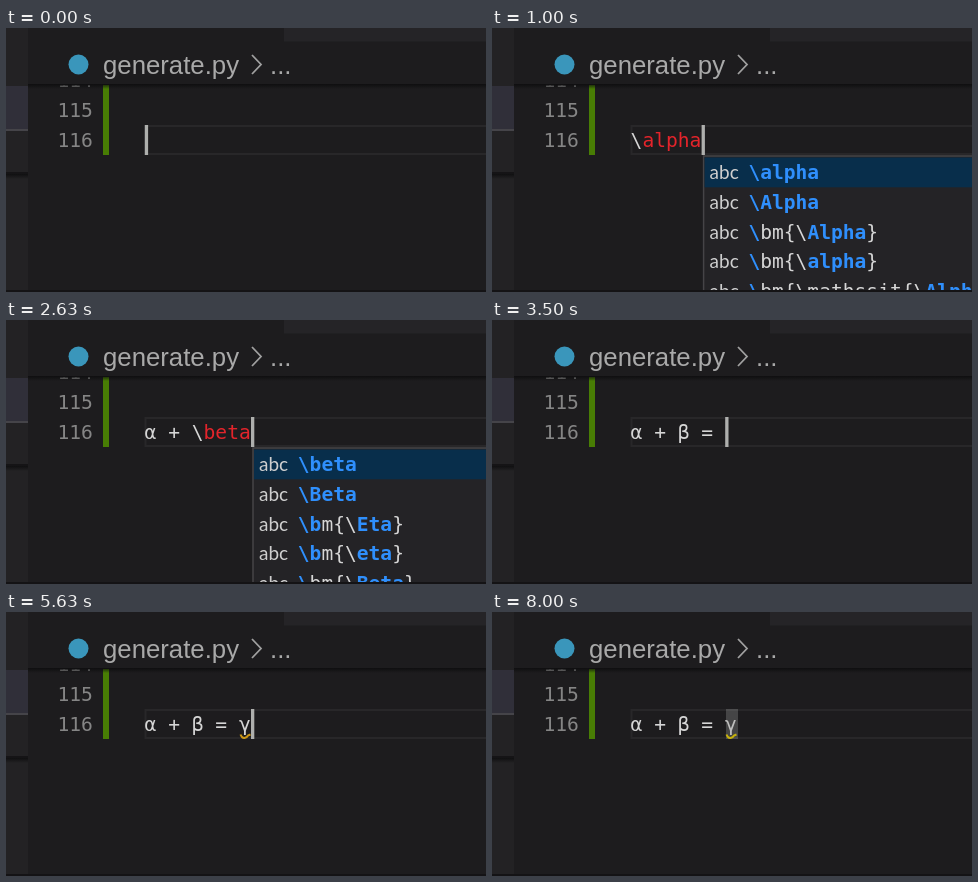
An HTML page for the animation above (8370 ms loop, 480 px wide and 264 px high).

```html
<!DOCTYPE html>
<html lang="en">
<head>
<meta charset="utf-8">
<title>Typing Greek letters in an editor</title>
<style>
  html, body { margin: 0; width: 100%; height: 100%; overflow: hidden; background: #1d1c1e; }
  svg { display: block; width: 480px; height: 264px; }
  text { white-space: pre; }
  .mono { font: 19.6px "DejaVu Sans Mono", monospace; fill: #d6d6d6; }
  .number { fill: #858585; }
  .crumb { font: 25.75px "Liberation Sans", sans-serif; fill: #a9a9a9; }
  .kind { font: 19px Lato, sans-serif; fill: #cfcfcf; }
  .invalid { fill: #e3242b; }
  .match { fill: #2f8ffc; font-weight: bold; }
</style>
</head>
<body>
<svg viewBox="0 0 480 264">
  <defs>
    <linearGradient id="shade" x2="0" y2="1">
      <stop offset="0" stop-color="#0b0b0c" stop-opacity=".8"/>
      <stop offset="1" stop-color="#0b0b0c" stop-opacity="0"/>
    </linearGradient>
  </defs>
  <rect width="480" height="264" fill="#1d1c1e"/>

  <g id="editor">
    <text class="mono number" x="51.5" y="59.3">114</text>
    <text class="mono number" x="51.5" y="89.3">115</text>
    <text class="mono number" x="51.5" y="119.3">116</text>
    <rect x="97" y="57" width="6" height="70" fill="#487d04"/>
    <path d="M480 98H139.500V126H480" fill="none" stroke="#282729" stroke-width="2"/>
    <text id="line" class="mono" x="138.600" y="119.3"></text>
    <rect id="bar" y="97" width="3.3" height="30" fill="#aeafad"/>
    <g id="block">
      <rect x="234" y="97" width="12" height="30" fill="#aeafad"/>
      <text id="blockGlyph" class="mono" x="233" y="119.3" style="fill:#1d1c1e">γ</text>
    </g>
    <path id="squiggle" d="M234.500 122.500Q236 126.500 238.500 126Q241 125.500 242 123.500L244.500 122.500"
          fill="none" stroke-width="2"/>
    <g id="popup"></g>
  </g>

  <rect x="22" width="458" height="57" fill="#1d1c1e"/>
  <rect x="278" width="202" height="13.5" fill="#252427"/>
  <rect x="22" y="56" width="458" height="5" fill="url(#shade)"/>
  <circle cx="72.5" cy="36.5" r="10" fill="#3a96bb"/>
  <text class="crumb" x="97" y="45.500">generate.py</text>
  <path d="M246 27L255 36.500L246 46" fill="none" stroke="#a0a0a0" stroke-width="1.8"/>
  <text class="crumb" x="264" y="45.500">...</text>

  <rect width="22" height="264" fill="#232224"/>
  <rect y="58" width="22" height="44" fill="#302f39"/>
  <rect y="101" width="22" height="2" fill="#454449"/>
  <rect y="144" width="22" height="2" fill="#151416"/>
  <rect y="146" width="22" height="5" fill="url(#shade)"/>
  <rect y="262" width="480" height="2" fill="#141315"/>
</svg>
<script>
const LOOP = 8370, CHAR = 11.8, LEFT = 138.8, ROW = 29.8;
const $ = id => document.getElementById(id);

const suggestions = {
  a: ["\\alpha", "\\Alpha", "\\bm{\\Alpha}", "\\bm{\\alpha}", "\\bm{\\mathssit{\\Alpha}}"],
  b: ["\\beta", "\\Beta", "\\bm{\\Eta}", "\\bm{\\eta}", "\\bm{\\Beta}"],
  g: ["\\gamma", "\\Gamma", "\\bm{\\Gamma}", "\\bm{\\gamma}", "\\bm{\\mathssit{\\Gamma}}"]
};

// One key every 125 ms; each entry is [time, accepted text, pending command].
const typeCommand = (start, before, command, from = 1) =>
  Array.from({ length: command.length - from + 1 }, (_, i) =>
    [start + Math.ceil(i * 12.5) * 10, before, command.slice(0, from + i), command[1]]);

const edits = [
  [0, ""],
  ...typeCommand(130, "", "\\alpha"),
  [1130, "α"], [1500, "α "], [2000, "α + "],
  ...typeCommand(2250, "α + ", "\\beta", 2),
  [2880, "α + β"], [3130, "α + β "], [3250, "α + β ="], [3500, "α + β = "],
  ...typeCommand(3750, "α + β = ", "\\gamma"),
  [4630, "α + β = γ"]
];

const cursorLevels = [
  [0, 1], [5000, .5], [5130, 0], [5630, 1], [6000, .5], [6130, .05],
  [6500, 1], [6750, .8], [6880, .5], [7000, .28],
  [7500, 1], [7750, .8], [7880, .5], [8000, .28]
];

const current = (steps, t) => steps.filter(s => s[0] <= t).pop();
const span = (cls, s) => s ? `<tspan class="${cls}">${s}</tspan>` : "";

// Marks a leading part of the query plus the rest found later in the label.
function highlight(label, query) {
  for (let k = 1; k <= query.length; k++) {
    const tail = query.slice(k);
    const at = label.toLowerCase().indexOf(tail, k);
    if (label.startsWith(query.slice(0, k)) && at >= 0) {
      const end = at + tail.length;
      return span("match", label.slice(0, k)) + label.slice(k, at) +
        span("match", label.slice(at, end)) + label.slice(end);
    }
  }
  return label;
}

function popupMarkup(x, query, key) {
  const rows = suggestions[key].map((label, i) => {
    const y = 151 + i * ROW;
    return `<text class="kind" x="${x + 8}" y="${y}">abc</text>
      <text class="mono" x="${x + 46.8}" y="${y}">${highlight(label, query)}</text>`;
  }).join("");
  return `<rect x="${x + 2}" y="128" width="500" height="300" fill="#242326" stroke="#454447" stroke-width="1.5"/>
    <rect x="${x + 3}" y="129.5" width="500" height="${ROW}" fill="#082e4b"/>${rows}`;
}

let shown;
function showEdit(edit) {
  if (edit === shown) return;
  shown = edit;
  const [, text, command = "", key] = edit;
  const x = LEFT + (text + command).length * CHAR;
  $("line").innerHTML = text + command.slice(0, 1) + span("invalid", command.slice(1));
  $("bar").setAttribute("x", x);
  $("popup").innerHTML = command ? popupMarkup(x, command, key) : "";
}

function draw(now) {
  const t = now % LOOP;
  const normalMode = t >= 6500;
  const level = current(cursorLevels, t)[1];
  showEdit(current(edits, t));
  $("bar").setAttribute("opacity", normalMode ? 0 : level);
  $("block").setAttribute("opacity", normalMode ? level : 0);
  $("blockGlyph").setAttribute("opacity", level);
  $("squiggle").setAttribute("opacity", t >= 5380 ? 1 : 0);
  $("squiggle").setAttribute("stroke", normalMode ? "#c6b10c" : "#c99516");
  requestAnimationFrame(() => draw(performance.now() - start));
}

const start = performance.now();
draw(0);
</script>
</body>
</html>
```
